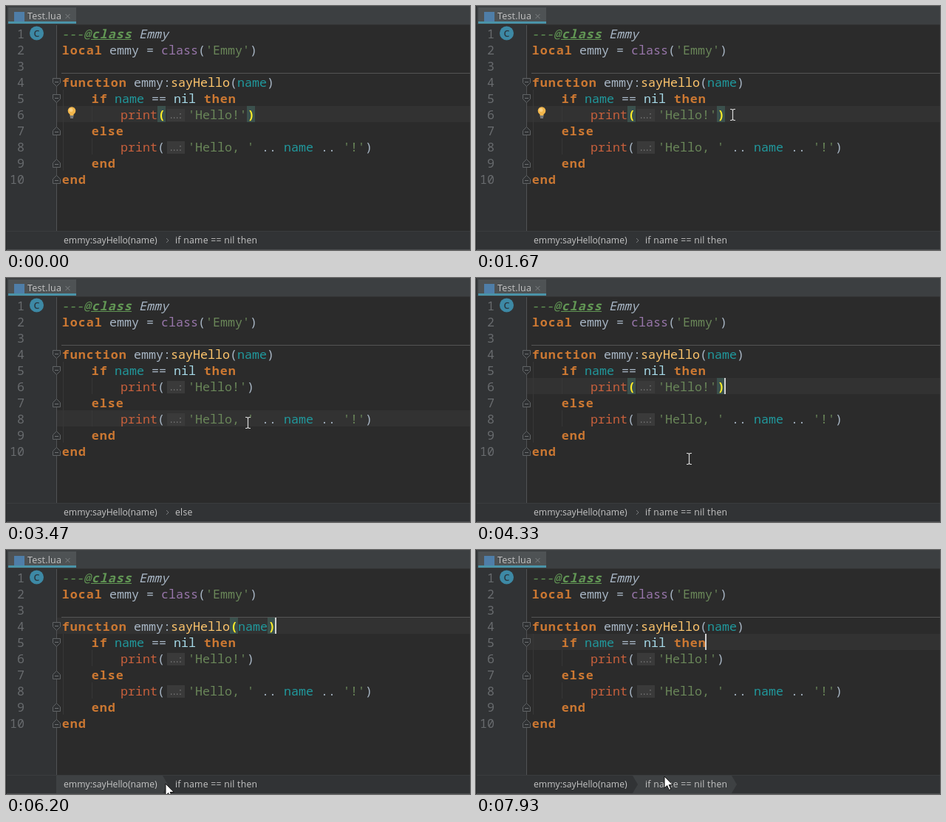
These frames come from a looping animation (628x332 px, 8 s). An HTML page with a canvas:

```html
<!DOCTYPE html>
<html lang="en">
<head>
<meta charset="utf-8">
<title>Lua breadcrumbs</title>
<style>
  html, body { margin: 0; width: 100%; height: 100%; overflow: hidden; background: #2b2b2b; }
  canvas { display: block; width: 628px; height: 332px; }
</style>
</head>
<body>
<canvas id="stage"></canvas>
<script>
const W = 628, H = 332, LOOP = 8000, STEP = 1000 / 15;
const canvas = document.getElementById('stage');
const dpr = window.devicePixelRatio || 1;
canvas.width = W * dpr;
canvas.height = H * dpr;
const ctx = canvas.getContext('2d');
ctx.scale(dpr, dpr);

const MONO = '"Noto Sans Mono", "DejaVu Sans Mono", monospace';
const UI = '"Open Sans", "Noto Sans", sans-serif';
const CODE_SIZE = 16.667, LEFT = 75, ROW = 22;
const rowTop = line => 26 + (line - 1) * ROW;

// A run is [text, colour, style]: b bold, i italic, u underline, p parenthesis that can light up.
const run = (color, style = '') => s => [s, color, style];
const key = run('#cc7832', 'b'), plain = run('#a9b7c6'), paren = run('#a9b7c6', 'p');
const str = run('#6a8759'), std = run('#c8603c'), call = run('#9876aa');
const name = run('#20999d')('name');
const HINT = null;
const lines = [
  [run('#629755', 'i')('---@'), run('#629755', 'biu')('class'), plain(' '), run('#a9b7c6', 'i')('Emmy')],
  [key('local'), plain(' emmy = '), call('class'), plain('('), str("'Emmy'"), plain(')')],
  [],
  [key('function'), plain(' emmy:'), run('#ffc66d')('sayHello'), paren('('), name, paren(')')],
  [plain('    '), key('if'), plain(' '), name, plain(' == '), run('#a5d8e6')('nil'), plain(' '), key('then')],
  [plain('        '), std('print'), paren('('), HINT, str("'Hello!'"), paren(')')],
  [plain('    '), key('else')],
  [plain('        '), std('print'), plain('('), HINT, str("'Hello, '"), plain(' .. '), name,
    plain(' .. '), str("'!'"), plain(')')],
  [plain('    '), key('end')],
  [key('end')]
];

// Pointer stops: arrival time, x, y. Every move takes at most MOVE ms.
const MOVE = 330, APPEAR = 195;
const stops = [
  [0, 588, 318], [600, 310, 227], [1130, 246, 198], [1670, 347, 148], [1933, 356, 147],
  [2533, 327, 197], [3800, 349, 147], [4333, 288, 246], [4667, 250, 316], [5200, 164, 318],
  [6200, 216, 318], [6533, 264, 314], [7667, 258, 311], [7933, 255, 308]
];

// Clicks: time, line, column x (the line end if left out)
const clicks = [[-LOOP, 6], [1860, 6], [2865, 8, 325], [3800, 6], [5665, 4], [6858, 5]];
const wakes = [2530, 4400, 5395]; // moments that restart the caret's blinking
const BLINK = 536, BULB_DELAY = 865, CRUMB_DELAY = 200;

const clickAt = t => clicks.filter(c => c[0] <= t).pop();

function caretOn(t) {
  const last = Math.max(...clicks.map(c => c[0]).concat(wakes).filter(s => s <= t));
  return last > 0 && Math.floor((t - last) / BLINK) % 2 === 0;
}

function pointerAt(t) {
  const next = stops.findIndex(s => s[0] > t);
  if (next < 0) return stops[stops.length - 1].slice(1);
  const [t0, x0, y0] = stops[next - 1], [t1, x1, y1] = stops[next];
  const from = Math.max(t0, t1 - MOVE);
  const k = Math.max(0, (t - from) / (t1 - from));
  const e = k * k * (3 - 2 * k);
  return [Math.round(x0 + (x1 - x0) * e), Math.round(y0 + (y1 - y0) * e)];
}

function rect(x, y, w, h, color) {
  ctx.fillStyle = color;
  ctx.fillRect(x, y, w, h);
}

function trace(points) {
  ctx.beginPath();
  points.forEach(([x, y]) => ctx.lineTo(x, y));
}

function poly(points, fill, edge) {
  trace(points);
  ctx.closePath();
  ctx.fillStyle = fill;
  ctx.fill();
  if (edge) {
    ctx.strokeStyle = edge;
    ctx.lineWidth = 1;
    ctx.stroke();
  }
}

function stroke(points, color, width = 1) {
  trace(points);
  ctx.strokeStyle = color;
  ctx.lineWidth = width;
  ctx.stroke();
}

function disc(x, y, r, color) {
  ctx.beginPath();
  ctx.arc(x, y, r, 0, Math.PI * 2);
  ctx.fillStyle = color;
  ctx.fill();
}

function text(s, x, y, font, color, align = 'left', spacing = 0) {
  ctx.font = font;
  ctx.textAlign = align;
  ctx.letterSpacing = spacing + 'px';
  ctx.fillStyle = color;
  ctx.fillText(s, x, y);
}

function drawTab() {
  rect(0, 0, W, 25, '#3c3f41');
  rect(3, 2, 92, 20, '#4e5254');
  rect(3, 21, 92, 3, '#4a93a8');
  rect(0, 25, W, 1, '#323232');
  rect(11, 8, 14, 13, '#4f7ea8');
  text('Test.lua', 29, 18, '12.5px ' + UI, '#c4c4c4', 'left', 0.2);
  stroke([[80.5, 11], [86.5, 17]], '#7d8183');
  stroke([[86.5, 11], [80.5, 17]], '#7d8183');
}

function drawFold(line, dir) {
  const y = rowTop(line) + 12, x = 68.5;
  const shape = [[-5, -5.5], [5, -5.5], [5, 0.5], [0, 5.5], [-5, 0.5]];
  poly(shape.map(([a, b]) => [x + a, y + b * dir]), '#2f3133', '#606365');
  stroke([[x - 2.5, y - dir + 0.5], [x + 2.5, y - dir + 0.5]], '#707375');
}

function drawGutter() {
  rect(0, 26, 69, 281, '#313335');
  rect(68, 26, 1, 281, '#505254');
  lines.forEach((_, i) => {
    text(String(i + 1), 25, rowTop(i + 1) + 18, CODE_SIZE + 'px ' + MONO, '#686b6e', 'right');
  });
  disc(41.5, 37, 9.5, '#3d89a5');
  text('C', 41.5, 41.5, '600 12.5px ' + UI, '#2b3942', 'center');
  [4, 5].forEach(n => drawFold(n, 1));
  [7, 9, 10].forEach(n => drawFold(n, -1));
}

function drawHint(y) {
  rect(218, y + 4, 24, 17, '#3a3a3a');
  text('...:', 222, y + 17, '13px ' + UI, '#7b7b7b', 'left', 0.6);
}

// Draws one line of code and returns the x of its end.
function drawLine(runs, line, lit) {
  const y = rowTop(line);
  let x = LEFT;
  for (const part of runs) {
    if (part === HINT) {
      drawHint(y);
      x = 246;
      continue;
    }
    const [s, base, style] = part;
    const match = lit && style.includes('p');
    const bold = match || style.includes('b');
    const color = match ? '#ffef28' : base;
    const w = s.length * (bold ? 11 : 10);
    if (match) rect(x, y, w, ROW, '#3b514d');
    const font = (style.includes('i') ? 'italic ' : '') + (bold ? 'bold ' : '') + CODE_SIZE + 'px ' + MONO;
    text(s, bold ? x + 0.8 : x, y + 18, font, color, 'left', bold ? 1 : 0);
    if (style.includes('u')) rect(x, y + 19, w, 1, color);
    x += w;
  }
  return x;
}

function drawBulb() {
  disc(89, 142.5, 5.3, '#f2b64c');
  disc(88, 141.5, 2.5, '#f9d184');
  rect(86.5, 146, 5, 3, '#f2b64c');
  rect(86.5, 149.5, 5, 1, '#b9bcbe');
  rect(87, 151.5, 4, 1, '#b9bcbe');
}

function drawCode(t) {
  const [time, line, column] = clickAt(t);
  rect(69, rowTop(line), W - 69, ROW, '#323232');
  rect(75, 91, W - 75, 1, '#555555');
  rect(77, rowTop(5), 1, ROW * 5, '#373737');
  [6, 8].forEach(n => rect(116, rowTop(n), 1, ROW, '#373737'));

  const ends = lines.map((runs, i) => drawLine(runs, i + 1, line === i + 1));
  if (line === 6 && t - time >= BULB_DELAY) drawBulb();
  if (caretOn(t)) rect(column || ends[line - 1] - 1, rowTop(line), 2, ROW, '#d0d0d0');
}

function drawCrumb(left, right, notch) {
  poly([[left, 307], [right, 307], [right + 7, 319], [right, 331], [left, 331], [left + notch, 319]], '#3e4143');
}

function drawCrumbs(t, [x, y]) {
  rect(0, 306, W, 25, '#313335');
  rect(0, 306, W, 1, '#3a3c3e');
  const hover = y > 303 && t > MOVE * 2;
  const first = (hover && x < 219) || clickAt(t)[1] === 4;
  const second = hover && x >= 219;
  if (first) drawCrumb(68, 212, 0);
  if (second) drawCrumb(212, 346, 7);
  if (!first && !second) stroke([[217, 316], [220, 319], [217, 322]], '#77797b');

  const label = clickAt(t - CRUMB_DELAY)[1] === 8 ? 'else' : 'if name == nil then';
  text('emmy:sayHello(name)', 78, 323, '12.2px ' + UI, '#c6c6c6');
  text(label, 229, 323, '12.2px ' + UI, '#c6c6c6', 'left', 0.28);
  rect(0, 331, W, 1, '#494b4d');
}

function drawBeam(x, y) {
  const serif = d => [[-3, 7.5], [-1, 7.5], [0.5, 6.5], [2, 7.5], [4, 7.5]].map(([a, b]) => [x + a, y + b * d]);
  stroke(serif(-1), '#d8d8d8', 1.2);
  stroke([[x + 0.5, y - 7], [x + 0.5, y + 7]], '#d8d8d8', 1.2);
  stroke(serif(1), '#d8d8d8', 1.2);
}

function drawArrow(x, y) {
  const shape = [[0, 0], [0, 16], [3.7, 12.6], [6.3, 18.5], [8.8, 17.4], [6.2, 11.6], [11.3, 11.6]];
  poly(shape.map(([a, b]) => [x + a, y + b]), '#ffffff', '#111111');
}

function draw(t) {
  const pointer = pointerAt(t);
  rect(0, 0, W, H, '#2b2b2b');
  drawTab();
  drawCode(t);
  drawGutter();
  drawCrumbs(t, pointer);
  rect(0, 0, 1, H, '#282a2b');
  if (t >= APPEAR) (pointer[1] > 303 ? drawArrow : drawBeam)(...pointer);
}

const start = performance.now();
function tick() {
  const t = (performance.now() - start) % LOOP;
  draw(Math.floor((t + 5) / STEP) * STEP % LOOP);
  requestAnimationFrame(tick);
}
tick();
</script>
</body>
</html>
```
